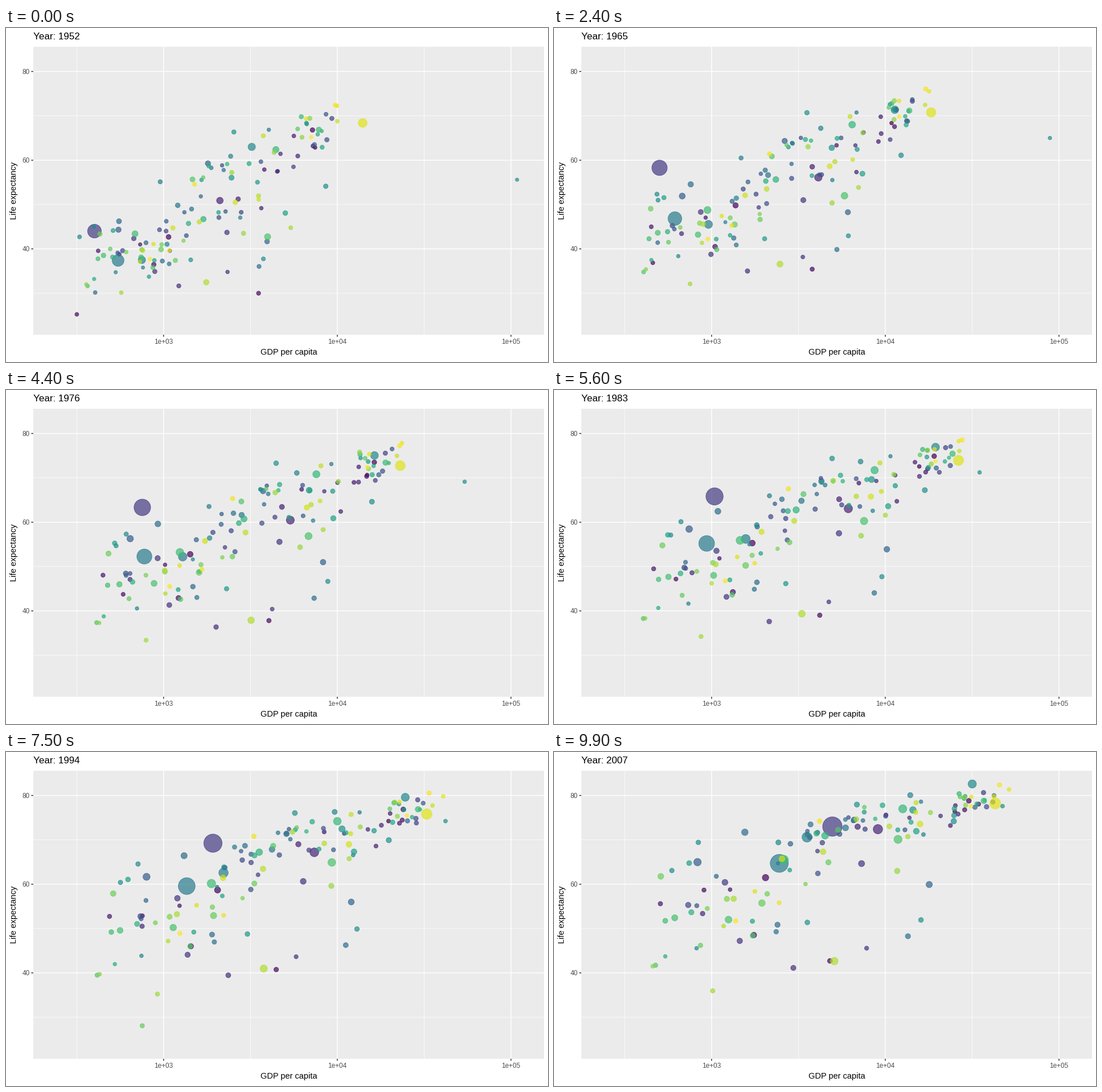
A matplotlib script that plays this animation: 952x588 px, repeating every 10000 ms.

```python
import matplotlib.pyplot as plt
import numpy as np
from matplotlib.animation import FuncAnimation

W, H, DPI = 952, 588, 100
FRAMES, INTERVAL = 100, 100
START, END = 1952, 2007
COUNT = 142

# rank: start, end (income, life, millions) and easing powers (income, life)
LEADERS = {
    3: ((3521, 30, 4), (4797, 42.7, 12), (1, 0.6)),
    14: ((2109, 50.9, 57), (9066, 72.4, 190), (0.55, 1)),
    24: ((400, 44, 556), (4959, 73, 1319), (1.7, 0.5)),
    58: ((547, 37.4, 372), (2452, 64.7, 1110), (1.8, 0.75)),
    59: ((750, 37.5, 82), (3541, 70.6, 223), (1.3, 1)),
    66: ((3217, 63, 86), (31656, 82.6, 127), (0.42, 0.6)),
    71: ((108382, 55.6, 0.2), (47307, 77.6, 2.5), (1, 0.6)),
    97: ((685, 43.4, 41), (2606, 65.5, 169), (1, 1)),
    107: ((493, 40, 2.5), (863, 46.2, 8.9), (1, 1)),
    134: ((13990, 68.4, 158), (42952, 78.2, 301), (1, 1)),
}

# count, correlation, skew, population growth, then at start and end:
# mean and spread of log income, mean and spread of life expectancy
GROUPS = [
    (50, 0.5, 0.2, 3.8, (2.96, 0.27, 39.3, 5.0), (3.26, 0.43, 54.8, 9.6)),
    (27, 0.75, 0, 3.2, (3.15, 0.32, 47, 8.5), (3.8, 0.46, 71.5, 5.0)),
    (23, 0.6, 0, 2.7, (3.48, 0.25, 53.5, 8.5), (3.93, 0.27, 73.7, 3.0)),
    (32, 0.85, -0.2, 1.4, (3.72, 0.22, 65, 4.5), (4.36, 0.25, 77.8, 2.6)),
]

rng = np.random.default_rng(52)


def scores(n):
    z = np.clip(rng.standard_normal(n), -1.8, 1.8)
    return (z - z.mean()) / z.std()


def build():
    """Start, end and easing power of log income, life and population."""
    start, end = np.empty((2, COUNT, 3))
    power = np.tile([0.75, 0.75, 1.0], (COUNT, 1))
    for rank, (a, b, ease) in LEADERS.items():
        start[rank] = np.log10(a[0]), *a[1:]
        end[rank] = np.log10(b[0]), *b[1:]
        power[rank, :2] = ease

    free = rng.permutation([r for r in range(COUNT) if r not in LEADERS])
    for n, rho, skew, growth, *stats in GROUPS:
        ranks, free = free[:n], free[n:]
        zx = scores(n)
        zy = rho * zx + np.sqrt(1 - rho ** 2) * scores(n)
        zx = zx + skew * (zx ** 2 - 1)
        pop = np.clip(np.exp(rng.normal(1.2, 1.1, n)), 0.1, 45)
        for table, scale, (mx, sx, my, sy) in zip((start, end), (1, growth), stats):
            life = np.minimum(my + sy * zy, 82)
            table[ranks] = np.column_stack([mx + sx * zx, life, pop * scale])
    return start, end, power


def spike(year, peak, reach):
    return max(0, 1 - abs(year - peak) / reach)


def state(year):
    t = (year - START) / (END - START)
    now = A + (B - A) * t ** POWER
    k = (year - START) / 5
    i = min(int(k), len(WOBBLE) - 2)
    now[:, :2] += WOBBLE[i] + (WOBBLE[i + 1] - WOBBLE[i]) * (k - i)
    now[71, 0] -= 0.33 * spike(year, 1985, 15)
    now[107, 1] -= 21 * spike(year, 1992, 8)
    return now


def pt(px):
    return px * 72 / DPI


def areas(pop):
    size = 2 + 10 * np.sqrt(pop / 1319)
    return pt(size * 2.845) ** 2


A, B, POWER = build()
# five-yearly jitter gives each path its slight kinks
WOBBLE = rng.normal(0, (0.02, 0.35), (12, COUNT, 2))
WOBBLE[:, list(LEADERS)] = 0

plt.rcParams["font.family"] = "Liberation Sans"
fig = plt.figure(figsize=(W / DPI, H / DPI), dpi=DPI, facecolor="white")
ax = fig.add_axes([48 / W, 48 / H, 897 / W, 507 / H], facecolor="#EBEBEB")
ax.set_xlim(2.2501, 5.190)
ax.set_ylim(20.64, 85.58)
ax.set_xticks([])
ax.set_yticks([])
ax.spines[:].set_visible(False)


def label(x, y, text, px, color="black", **kw):
    return fig.text(x / W, 1 - y / H, text, fontsize=pt(px), color=color, **kw)


def tick(xs, ys):
    fig.add_artist(plt.Line2D(np.array(xs) / W, 1 - np.array(ys) / H,
                              color="#333333", lw=pt(1.42), snap=False,
                              solid_capstyle="butt"))


def grid(draw, values, width):
    for v in values:
        draw(v, color="white", lw=pt(width), zorder=0, snap=False)


grid(ax.axvline, (2.5, 3.5, 4.5), 0.71)
grid(ax.axhline, (30, 50, 70), 0.71)
grid(ax.axvline, (3, 4, 5), 1.42)
grid(ax.axhline, (40, 60, 80), 1.42)

for e in (3, 4, 5):
    px = 276.8 + 305.1 * (e - 3)
    tick((px, px), (540, 543.7))
    label(px, 556, f"1e+0{e}", 11.73, "#4D4D4D", ha="center")
for life in (40, 60, 80):
    py = 232.7 - 7.808 * (life - 60)
    tick((44.3, 48), (py, py))
    label(41.5, py + 4.3, str(life), 11.73, "#4D4D4D", ha="right")

label(496.5, 574.5, "GDP per capita", 14.5, ha="center")
label(18.5, 286.5, "Life expectancy", 14.5, ha="center", va="baseline",
      rotation=90, rotation_mode="anchor")
title = label(47.5, 20.5, "", 17)

colors = plt.get_cmap("viridis")(np.linspace(0, 1, COUNT), alpha=0.7)
dots = ax.scatter(A[:, 0], A[:, 1], s=areas(A[:, 2]), facecolors=colors,
                  edgecolors=colors, linewidths=pt(0.945), zorder=3)


def update(i):
    year = START + (END - START) * i / (FRAMES - 1)
    now = state(year)
    dots.set_offsets(now[:, :2])
    dots.set_sizes(areas(now[:, 2]))
    title.set_text(f"Year: {round(year)}")
    return dots, title


anim = FuncAnimation(fig, update, frames=FRAMES, interval=INTERVAL,
                     repeat=True, repeat_delay=0)
plt.show()
```
